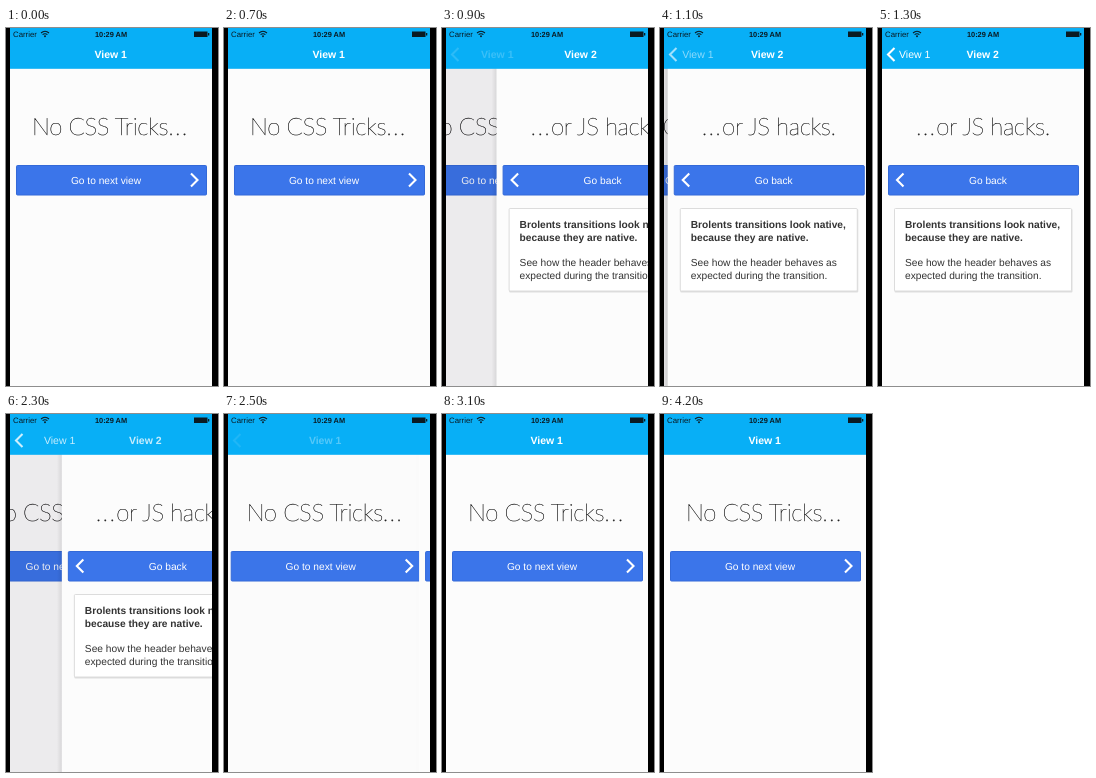
An HTML page that plays this animation: 212 px wide and 358 px high, repeating every 4.3 s.

```html
<!DOCTYPE html>
<html lang="en">
<head>
<meta charset="utf-8">
<title>View transition</title>
<style>
  html, body { margin: 0; width: 100%; height: 100%; overflow: hidden; background: #000; }
  svg { display: block; width: 100vw; height: 100vh; }
  text { font: 10.2px "Liberation Sans", Arial, sans-serif; fill: #333; text-rendering: geometricPrecision; }
  .mid { text-anchor: middle; }
  .bold { font-weight: 700; }
  .nav { font-size: 10.5px; fill: #fff; }
  .label { fill: #fff; }
  .status { font-size: 7.8px; fill: #0a1a22; }
  .clock { font-size: 7.4px; }
  .thin { font: 100 24px Lato, Inter, sans-serif; letter-spacing: -.4px; fill: #222; stroke: #222; stroke-width: .3px; }
  .dots { letter-spacing: 1.2px; }
  .button { fill: #3b75ea; stroke: #3369d8; }
  .chevron { fill: none; stroke: #fff; stroke-width: 2.1; }
</style>
</head>
<body>
<svg viewBox="0 0 212 358" preserveAspectRatio="none">
  <defs>
    <linearGradient id="edge">
      <stop offset="0" stop-opacity="0"/>
      <stop offset="1" stop-opacity=".12"/>
    </linearGradient>
  </defs>

  <g id="view1">
    <rect x="4" y="40" width="264" height="318" fill="#fcfcfc"/>
    <text class="thin" x="26" y="107">No CSS Tricks<tspan class="dots">...</tspan></text>
    <rect class="button" x="10.5" y="137.5" width="190" height="29.5" rx="1"/>
    <text class="label mid" x="100" y="156">Go to next view</text>
    <path class="chevron" d="M185 145.5l6.5 6.5-6.5 6.5"/>
  </g>
  <rect id="dim" x="4" y="40" width="202" height="318" fill="#1c0c28"/>

  <g id="view2">
    <rect id="shadow" x="-1" y="40" width="5" height="318" fill="url(#edge)"/>
    <rect x="4" y="40" width="202" height="318" fill="#fcfcfc"/>
    <text class="thin" x="38" y="107"><tspan class="dots">...</tspan>or JS hacks.</text>
    <rect class="button" x="10.5" y="137.5" width="190" height="29.5" rx="1"/>
    <text class="label mid" x="110" y="156">Go back</text>
    <path class="chevron" d="M25.5 145.5l-6.5 6.5 6.5 6.5"/>
    <rect x="16.5" y="181" width="178" height="83.5" rx="1" fill="#ccc" opacity=".6"/>
    <rect x="16.5" y="180.5" width="177" height="82.5" rx="1" fill="#fff" stroke="#dcdcdc"/>
    <text class="bold" x="27" y="200">Brolents transitions look native,</text>
    <text class="bold" x="27" y="213">because they are native.</text>
    <text x="27" y="238">See how the header behaves as</text>
    <text x="27" y="251">expected during the transition.</text>
  </g>

  <rect x="4" width="202" height="40.8" fill="#08aff6"/>
  <text id="title1" class="nav bold mid" y="30">View 1</text>
  <text id="title2" class="nav bold mid" y="30">View 2</text>
  <text id="backLabel" class="nav" y="30">View 1</text>
  <path id="backArrow" class="chevron" d="M16.5 20l-6.5 6.5 6.5 6.5"/>

  <text class="status" x="7" y="9">Carrier</text>
  <g fill="none" stroke="#0a1a22" stroke-width="1.1">
    <path d="M35 5q4-3.4 8 0M36.6 6.7q2.4-2 4.8 0"/>
    <circle cx="39" cy="8.3" r=".4"/>
  </g>
  <text class="status clock bold mid" x="105" y="9">10:29 AM</text>
  <path d="M188 3.5h13.5v5.5H188zM202 5h1.3v2.5H202z" fill="#0a1a22"/>

  <path d="M0 0h4v358H0zM206 0h6v358h-6z"/>
</svg>
<script>
  const LOOP = 4300, STEP = 100, DURATION = 500;
  const PUSH_START = 762, POP_START = 2242;
  const WIDTH = 202, PARALLAX = 61, CENTER = 104.7, TITLE_SLIDE = 66;

  const el = id => document.getElementById(id);
  const clamp = v => Math.min(1, Math.max(0, v));
  const bezier = (a, b, s) => 3 * a * s * (1 - s) ** 2 + 3 * b * s * s * (1 - s) + s ** 3;

  // cubic-bezier(.36, .66, .04, 1)
  function ease(x) {
    let lo = 0, hi = 1;
    for (let i = 0; i < 24; i++) {
      const mid = (lo + hi) / 2;
      if (bezier(.36, .04, mid) < x) lo = mid; else hi = mid;
    }
    return bezier(.66, 1, hi);
  }

  const shift = (id, dx) => el(id).setAttribute('transform', `translate(${dx} 0)`);
  const fade = (id, opacity) => el(id).setAttribute('opacity', clamp(opacity));
  function place(id, x, opacity) {
    el(id).setAttribute('x', x);
    fade(id, opacity);
  }

  function draw(time) {
    const popping = time >= POP_START;
    const t = clamp((time - (popping ? POP_START : PUSH_START)) / DURATION);
    const p = popping ? 1 - ease(t) : ease(t);   // 0: first view, 1: second view
    const late = (t - .3) / .7;

    shift('view1', -PARALLAX * p);
    shift('view2', WIDTH * (1 - p));
    fade('dim', .09 * p);
    fade('shadow', p);

    place('title1', CENTER - TITLE_SLIDE * p, popping ? late : 1 - 2.9 * t);
    place('backLabel', 21 + TITLE_SLIDE * (1 - p), popping ? 1 - 2 * t : late);
    place('title2', CENTER + 135 * (1 - p), popping ? 1 - 2 * t : 4 * t);
    fade('backArrow', popping ? 1 - 1.75 * t : (t - .15) / .85);
  }

  function tick() {
    draw(Math.floor(performance.now() % LOOP / STEP) * STEP);
    requestAnimationFrame(tick);
  }
  tick();
</script>
</body>
</html>
```
